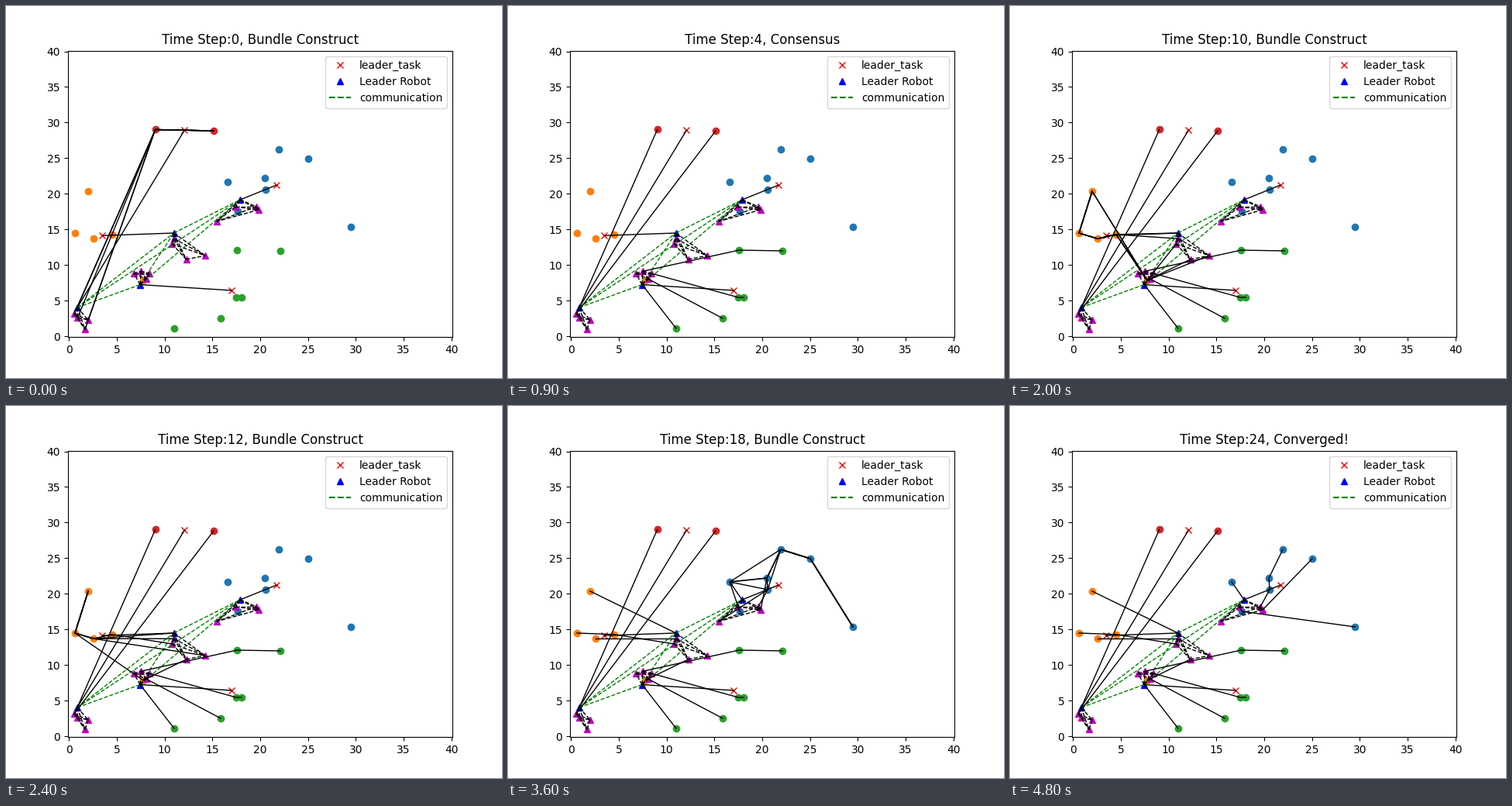
These frames come from a looping animation (640x480 px, 4900 ms). A matplotlib script:

```python
import numpy as np
import matplotlib.pyplot as plt
from matplotlib.animation import FuncAnimation
from matplotlib.lines import Line2D

DECAY = 0.95

# Site map in bidding order: (tasks, robots), the first robot leads.
SITES = [
    ([(9.03, 29.02), (15.14, 28.85)],
     [(0.87, 4.05), (0.55, 3.18), (0.91, 2.64), (2.01, 2.31), (1.68, 0.96)]),
    ([(11, 1.12), (15.87, 2.53), (17.49, 5.47), (18.06, 5.47), (17.57, 12.1),
      (22.11, 12)],
     [(7.44, 7.26), (6.79, 8.84), (7.52, 9.14), (8.41, 8.84), (8.09, 8.05)]),
    ([(2.01, 20.37), (0.63, 14.5), (2.57, 13.71), (4.52, 14.3), (7.76, 7.86)],
     [(10.97, 14.5), (10.99, 13.71), (10.8, 12.97), (12.26, 10.8),
      (14.25, 11.34)]),
    ([(16.6, 21.68), (20.49, 22.22), (20.57, 20.59), (21.95, 26.24),
      (25.03, 24.94), (29.48, 15.37), (17.65, 17.54)],
     [(17.9, 19.17), (17.41, 18.2), (19.6, 18.2), (19.84, 17.76),
      (15.46, 16.13)]),
]


class Robot:
    """Bidder in a consensus-based bundle auction."""

    def __init__(self, pos, tasks):
        self.pos, self.tasks = pos, tasks
        self.bundle, self.path, self.bids = [], [], {}
        self.known = np.zeros(len(tasks))

    def route(self, path=None):
        path = self.path if path is None else path
        return np.array([self.pos] + [self.tasks[j] for j in path])

    def score(self, path):
        """Reward of each task on the path, fading with distance travelled."""
        legs = np.hypot(*np.diff(self.route(path), axis=0).T)
        return np.sum(DECAY ** np.cumsum(legs))

    def best_insert(self, j):
        base = self.score(self.path)
        gains = [self.score(self.path[:n] + [j] + self.path[n:]) - base
                 for n in range(len(self.path) + 1)]
        n = int(np.argmax(gains))
        return gains[n], j, n

    def build(self):
        while True:
            options = [self.best_insert(j) for j in range(len(self.tasks))
                       if j not in self.bundle]
            options = [o for o in options if o[0] > self.known[o[1]]]
            if not options:
                return
            gain, j, n = max(options)
            self.bundle.append(j)
            self.path.insert(n, j)
            self.bids[j] = gain

    def settle(self, top):
        """Keep tasks up to the first one lost; forget the bids after it."""
        lost = next((n for n, j in enumerate(self.bundle)
                     if self.bids[j] < top[j]), len(self.bundle))
        self.known = top.copy()
        self.known[self.bundle[lost + 1:]] = 0
        self.bundle = self.bundle[:lost]
        self.path = [j for j in self.path if j in self.bundle]
        self.bids = {j: self.bids[j] for j in self.bundle}


def simulate():
    teams = [[Robot(pos, tasks) for pos in robots] for tasks, robots in SITES]
    everyone = sum(teams, [])
    history, step = [], 0

    def record(label):
        history.append((f"Time Step:{step}, {label}",
                        [r.route() for r in everyone]))

    # Each round settles one more task; the last round confirms agreement.
    for team in teams:
        count = len(team[0].tasks)
        for _ in range(count + 1):
            for r in team:
                r.build()
            record("Bundle Construct")
            top = np.array([max(r.bids.get(j, 0) for r in team)
                            for j in range(count)])
            for r in team:
                r.settle(top)
            record("Consensus")
            step += 1
    record("Converged!")
    return history


def connect(ax, points, style):
    for i, a in enumerate(points):
        for b in points[i + 1:]:
            ax.plot(*zip(a, b), style, lw=1)


history = simulate()

fig, ax = plt.subplots(figsize=(6.4, 4.8), dpi=100)
ax.set(xlim=(-0.1, 40.1), ylim=(-0.1, 40.1))

for i, (tasks, _) in enumerate(SITES):
    ax.plot(*zip(*tasks), "o", color=f"C{3 - i}")
for tasks, robots in SITES:
    ax.plot(*np.mean(tasks, axis=0), "rx")
    ax.plot(*zip(*robots[1:]), "m^")
    ax.plot(*robots[0], "b^")
connect(ax, [robots[0] for _, robots in SITES], "g--")
for tasks, robots in SITES:
    connect(ax, robots, "k--")
    connect(ax, [robots[0], np.mean(tasks, axis=0)], "k-")

routes = [ax.plot([], [], "k-", lw=1)[0] for _ in history[0][1]]
title = ax.set_title("")
ax.legend(handles=[
    Line2D([], [], color="r", marker="x", ls="None", label="leader_task"),
    Line2D([], [], color="b", marker="^", ls="None", label="Leader Robot"),
    Line2D([], [], color="g", ls="--", label="communication"),
], loc="upper right")


def update(i):
    text, paths = history[i]
    title.set_text(text)
    for line, pts in zip(routes, paths):
        line.set_data(*pts.T)
    return [title, *routes]


anim = FuncAnimation(fig, update, frames=len(history), interval=100,
                     repeat=True, repeat_delay=0, blit=False)
plt.show()
```
